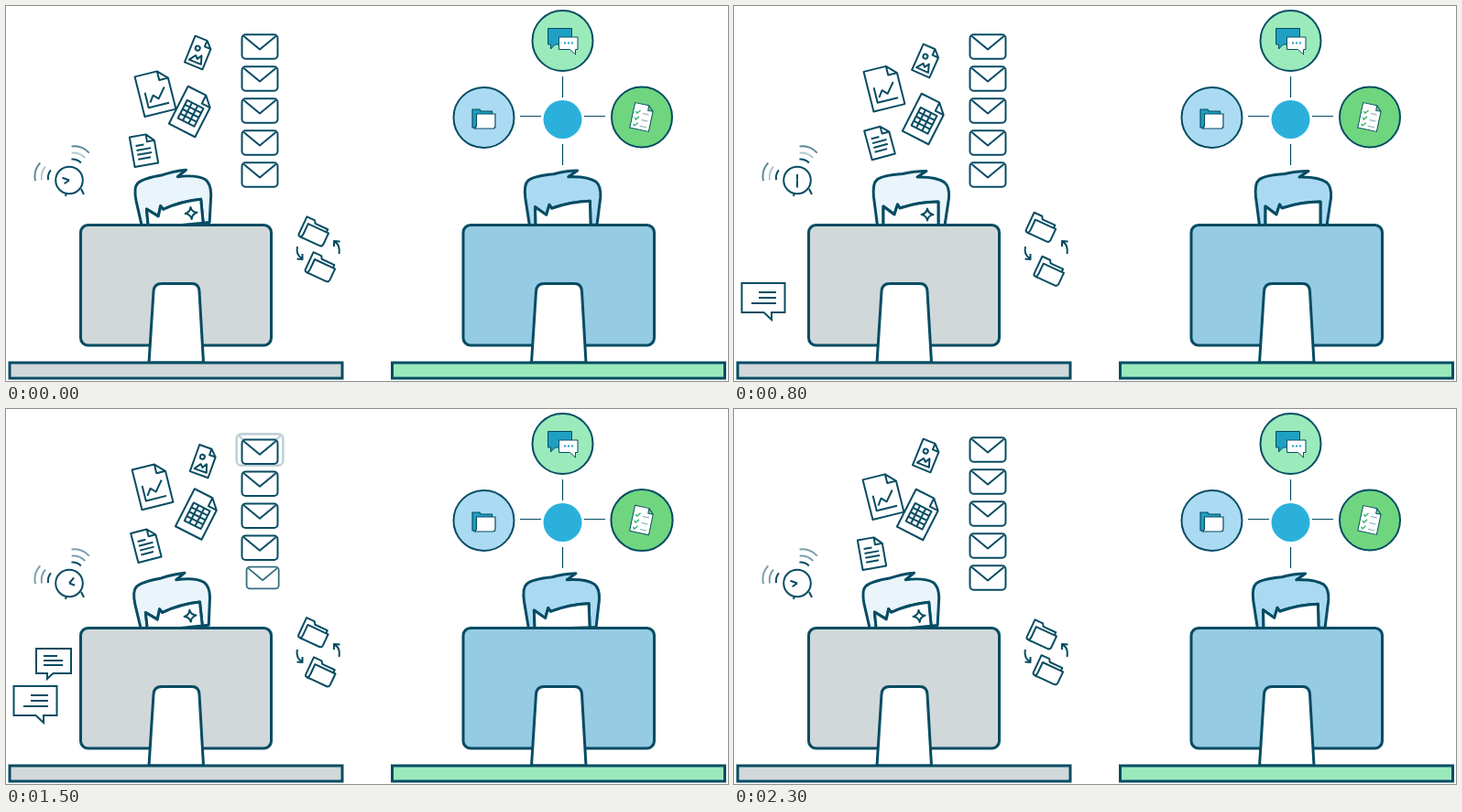
These frames come from a looping animation (788 by 410 pixels, 2400 ms). An HTML page:

```html
<!DOCTYPE html>
<html lang="en">
<head>
<meta charset="utf-8">
<title>Busy desk, calm desk</title>
<style>
  html, body { margin: 0; width: 100%; height: 100%; overflow: hidden; background: #fff; }
  svg { display: block; width: 788px; height: 410px; }
  .ink { fill: #fff; stroke: #064c63; stroke-width: 2; stroke-linejoin: round; }
  .bold { stroke-width: 3; }
  .line { fill: none; }
  .sharp { stroke-linejoin: miter; }
  .write { fill: none; stroke-dasharray: 1 2; }
</style>
</head>
<body>
<svg viewBox="0 0 788 410">
  <defs>
    <g id="hair">
      <path d="M156.500 240L152.500 209Q151 194 156 190Q162 185 184 183.500Q196 180.500 210 180.500L200 187Q221 186.500 230 193Q235.500 198 234.500 210L230 240H223V214Q202 214 181 221L178.500 217L175 228L163 219V240Z"/>
      <path d="M163 240V219L175 228L178.500 217L181 221Q202 214 223 214V240Z" fill="#fff"/>
    </g>
    <path id="stand" d="M156 390L161 312Q161.500 303.500 170 303.500H203Q210.500 303.500 211 312L215.500 390Z"/>
    <g id="mail">
      <rect x="-19.500" y="-13.200" width="39" height="26.400" rx="4"/>
      <path d="M-17.500-11.500L0 3L17.500-11.500" class="line"/>
    </g>
    <g id="folder">
      <path d="M-14.500 9V-11.500H-5L-3-8.500H12V-4L-9 11.500H-12Q-14.500 11.500-14.500 9Z"/>
      <path d="M-10-5H14.500V8Q14.500 11.500 11 11.500H-11.500Q-10 10-10 7Z"/>
    </g>
  </defs>

  <!-- busy desk -->
  <g class="ink">
    <g id="image"></g>
    <g id="chart"></g>
    <g id="table"></g>
    <g id="text"></g>
    <g id="mails"></g>
    <g id="folderA"><use href="#folder"/></g>
    <g id="folderB"><use href="#folder"/></g>
    <path class="line" d="M318 263Q316 272 323 276M323.500 271V277L317.500 276.500M363.500 271Q365 261 359 258M358 263V257L364.500 257.500"/>
    <g id="waves" class="line"></g>
    <path d="M66 204L65 208M82 200L85 206"/>
    <circle cx="69" cy="190.500" r="14.800"/>
    <path id="handA" d="M69 190.500V182.500"/>
    <path id="handB" d="M69 190.500V184"/>
    <g id="bubbleA" class="sharp">
      <path d="M8.500 303H55.500V335H41V343L32.500 335H8.500Z"/>
      <path class="write" pathLength="1" d="M46 313H27"/>
      <path class="write" pathLength="1" d="M46 319H27"/>
      <path class="write" pathLength="1" d="M46 325H19"/>
    </g>
    <g id="bubbleB" class="sharp">
      <path d="M33 262H71V289H51.500L45 295V289H33Z"/>
      <path class="write" pathLength="1" d="M41 270H56"/>
      <path class="write" pathLength="1" d="M41 275H62"/>
      <path class="write" pathLength="1" d="M41 280H62"/>
    </g>
    <g id="headL" class="bold">
      <use href="#hair" fill="#e9f5fb"/>
      <path stroke-width="2" d="M211 221.500Q212 227 217.500 228Q212 229 211 234.500Q210 229 204.500 228Q210 227 211 221.500Z"/>
    </g>
    <g class="bold">
      <rect x="81.500" y="239.500" width="208" height="131.500" rx="8" fill="#d1d8da"/>
      <use href="#stand"/>
      <rect class="sharp" x="4" y="390" width="363" height="17" fill="#d1d8da"/>
    </g>
  </g>

  <!-- calm desk -->
  <g class="ink">
    <path stroke-width="1.200" d="M607.500 77V100M561 120.500H584M631 120.500H654M607.500 151V174"/>
    <circle cx="607.500" cy="124" r="21" fill="#2bb0dc" stroke="none"/>
    <g id="talk">
      <circle r="33" fill="#9beabb"/>
      <g stroke-width="1">
        <path fill="#1fa0c2" d="M-16-13.500H10V4H-8L-13 9V4H-16Z"/>
        <path d="M-4-4H16.500V9.500H14V15L8 9.500H-4Z"/>
        <path d="M1.500 2.500H3.500M5.500 2.500H7.500M9.500 2.500H11.500" stroke="#1fa0c2" stroke-width="2"/>
      </g>
    </g>
    <g id="files">
      <circle r="33" fill="#aadbf3"/>
      <g stroke-width="1.200">
        <path fill="#1fa0c2" d="M-12.500 11V-9H-5L-3-7H9V11Z"/>
        <path d="M-8-4H12.500V9Q12.500 12 10 12H-10.500Q-8 11-8 8Z"/>
      </g>
    </g>
    <g id="tasks">
      <circle r="33" fill="#6fd67f"/>
      <g transform="rotate(12)" stroke-width="1">
        <path d="M-10.500-14H5L10.500-8.500V14H-10.500ZM5-14V-8.500H10.500"/>
        <path class="line" stroke="#35b86a" stroke-width="1.400" d="M-7.500-5L-6-3L-3-7M-7.500 2L-6 4L-3 0M-7.500 9L-6 11L-3 7"/>
        <path stroke="#7fa9b5" d="M0-4H7M0 3H7M0 10H7"/>
      </g>
    </g>
    <g class="bold">
      <g id="headR"><use href="#hair" x="417" fill="#aadaf2"/></g>
      <rect x="499" y="239.500" width="208.500" height="131.500" rx="8" fill="#96cbe4"/>
      <use href="#stand" x="417.500"/>
      <rect class="sharp" x="421.500" y="390" width="363" height="17" fill="#9be9bb"/>
    </g>
  </g>
</svg>

<script>
const LOOP = 2400, STEP = 100, CYCLE = 2300;
const TIMES = [0, 400, 800, 1300, 1700, 2000, CYCLE];
const $ = id => document.getElementById(id);
const clamp = v => Math.max(0, Math.min(1, v));
const ramp = (t, from, to) => clamp((t - from) / (to - from));
const ease = p => p < .5 ? 4 * p ** 3 : 1 - 4 * (1 - p) ** 3;
const place = (id, x, y, turn = 0, scale = 1) =>
  $(id).setAttribute('transform', `translate(${x} ${y}) rotate(${turn}) scale(${scale})`);
const turn = (id, a, x, y) => $(id).setAttribute('transform', `rotate(${a} ${x} ${y})`);

// Smooth closed curve through one value per entry of TIMES
function sway(t, v) {
  const n = v.length;
  const time = i => TIMES[(i + n) % n] + CYCLE * Math.floor(i / n);
  const val = i => v[(i + n) % n];
  const slope = i => (val(i + 1) - val(i - 1)) / (time(i + 1) - time(i - 1));
  t %= CYCLE;
  let i = 0;
  while (t >= time(i + 1)) i++;
  const d = time(i + 1) - time(i), u = (t - time(i)) / d, w = 1 - u;
  return val(i) * w * w * (1 + 2 * u) + val(i + 1) * u * u * (3 - 2 * u)
    + d * u * w * (slope(i) * w - slope(i + 1) * u);
}

// Straight lines between [time, value] pairs
function follow(t, keys) {
  const i = Math.max(1, keys.findIndex(k => k[0] >= t));
  const [a, b] = [keys[i - 1], keys[i]];
  return a[1] + (b[1] - a[1]) * ramp(t, a[0], b[0]);
}

function sheet(id, w, h, fold, inside) {
  const x = w / 2, y = h / 2;
  $(id).innerHTML = `<path d="M${-x} ${-y}H${x - fold}L${x} ${fold - y}V${y}H${-x}Z
    M${x - fold} ${-y}V${fold - y}H${x}"/><path class="line" d="${inside}"/>`;
}
sheet('image', 21, 31, 7, 'M-7 11L-2 4L1 7L4 2L7 11ZM-5.500-4a2.500 2.500 0 1 0 5 0a2.500 2.500 0 1 0-5 0');
sheet('chart', 35, 45, 10, 'M-11-3V14H12M-8 9L-3 2L2 7L11-4');
sheet('table', 32, 46, 10, 'M-10-9H10V13H-10ZM-10-3.500H10M-10 2H10M-10 7.500H10M-4-9V13M3-9V13');
sheet('text', 26, 33, 8, 'M-8-6H1M-8-1H8M-8 4H8M-8 9H6');

const papers = [
  { id: 'image', x: [210.5, 210, 210, 216.5, 214.5, 214.5], y: [51, 58.5, 60, 58, 56, 53.5], a: [22, 24, 24, 19, 21, 21] },
  { id: 'chart', x: [163, 168.5, 164, 160.5, 160.5, 164.5], y: [95, 82.5, 89.5, 83.5, 86.5, 92.5], a: [-14, -13, -14, -14, -14, -14] },
  { id: 'table', x: [202.5, 205.5, 208.5, 210, 208.5, 204.5], y: [115.5, 126.5, 123.5, 116.5, 114, 112.5], a: [27, 27, 27, 27, 27, 27] },
  { id: 'text', x: [150.5, 153, 159, 154, 152, 150], y: [157.5, 156, 149, 150.5, 147, 149], a: [-10, -13, -15, -15, -14, -14] }
];

$('mails').innerHTML = '<use href="#mail"/>'.repeat(6);
const mails = [...$('mails').children];

const arcs = [23, 30, 37].map((r, i) => {
  const half = [14, 15, 16][i] * Math.PI / 180;
  const arc = deg => {
    const m = deg * Math.PI / 180;
    const at = a => `${69 + r * Math.cos(a)} ${190.5 + r * Math.sin(a)}`;
    return `M${at(m - half)}A${r * .6} ${r * .6} 0 0 1 ${at(m + half)}`;
  };
  $('waves').insertAdjacentHTML('beforeend', `<path d="${arc(-165)}${arc(-70)}"/>`);
  return $('waves').lastChild;
});

function drawMails(t) {
  const p = ramp(t, 1200, 1600), e = ease(p);
  mails.forEach((m, i) => {
    let x = 277, y = 44.5 + 35 * (i - e), s = 1, o = 1;
    if (i === 0) { y = 44.5; s = 1 + .4 * p; o = 1 - p; }
    if (i === 5) { x += 50 * (1 - e); y = 184.5; s = .6 + .4 * p; o = p && .2 + .8 * p; }
    m.setAttribute('transform', `translate(${x} ${y}) scale(${s})`);
    m.setAttribute('opacity', o);
  });
}

function drawBubble(id, t, start) {
  $(id).setAttribute('opacity', Math.min(ramp(t, start, start + 100), 1 - ramp(t, 1800, 2000)));
  $(id).querySelectorAll('.write').forEach((line, i) => {
    const from = start + 100 + i * 100;
    line.style.strokeDashoffset = 1 - ramp(t, from, from + 200);
    line.style.visibility = t > from ? 'visible' : 'hidden';
  });
}

function drawFolders(t) {
  const s = follow(t, [[0, .81], [100, 0], [200, -.8], [300, -1], [301, 1], [1100, 1], [1200, .9],
    [1300, .5], [1400, -.5], [1500, -.9], [1600, -1], [1601, 1], [2200, 1], [2300, .81]]);
  place('folderA', 340.3 - 4.4 * s, 266.3 - 24 * s, 25);
  place('folderB', 340.3 + 4.4 * s, 266.3 + 24 * s, 25);
}

function drawClock(t) {
  const u = t / CYCLE, p = (t + 400) % 800 / 800;
  turn('handA', -70 + 720 * u, 69, 190.5);
  turn('handB', 235 + 360 * u, 69, 190.5);
  arcs[1].setAttribute('opacity', follow(p, [[0, 1], [.15, .95], [.5, .3], [.65, .35], [1, 1]]));
  arcs[2].setAttribute('opacity', follow(p, [[0, 0], [.125, .3], [.5, .65], [.65, .8], [1, 0]]));
}

const pulse = (t, peak) => 1 + .07 * clamp(1 - Math.abs(t - peak) / 200);

function draw(t) {
  papers.forEach(d => place(d.id, sway(t, d.x), sway(t, d.y), sway(t, d.a)));
  drawMails(t);
  drawFolders(t);
  drawClock(t);
  drawBubble('bubbleA', t, 150);
  drawBubble('bubbleB', t, 850);
  turn('headL', sway(t, [-5.5, -.8, 0, -6.5, -5.6, -9.8]), 190, 320);
  turn('headR', sway(t, [-1.4, -.4, 0, -1.4, -2.6, -2.2]), 607, 320);
  place('files', 521.5, 122, 0, pulse(t, 600));
  place('talk', 607.5, 38, 0, pulse(t, 1050));
  place('tasks', 694, 121.5, 0, pulse(t, 1650));
}

const begin = performance.now();
function tick() {
  const t = (performance.now() - begin) % LOOP;
  draw(Math.floor(t / STEP) * STEP);
  requestAnimationFrame(tick);
}
tick();
</script>
</body>
</html>
```
